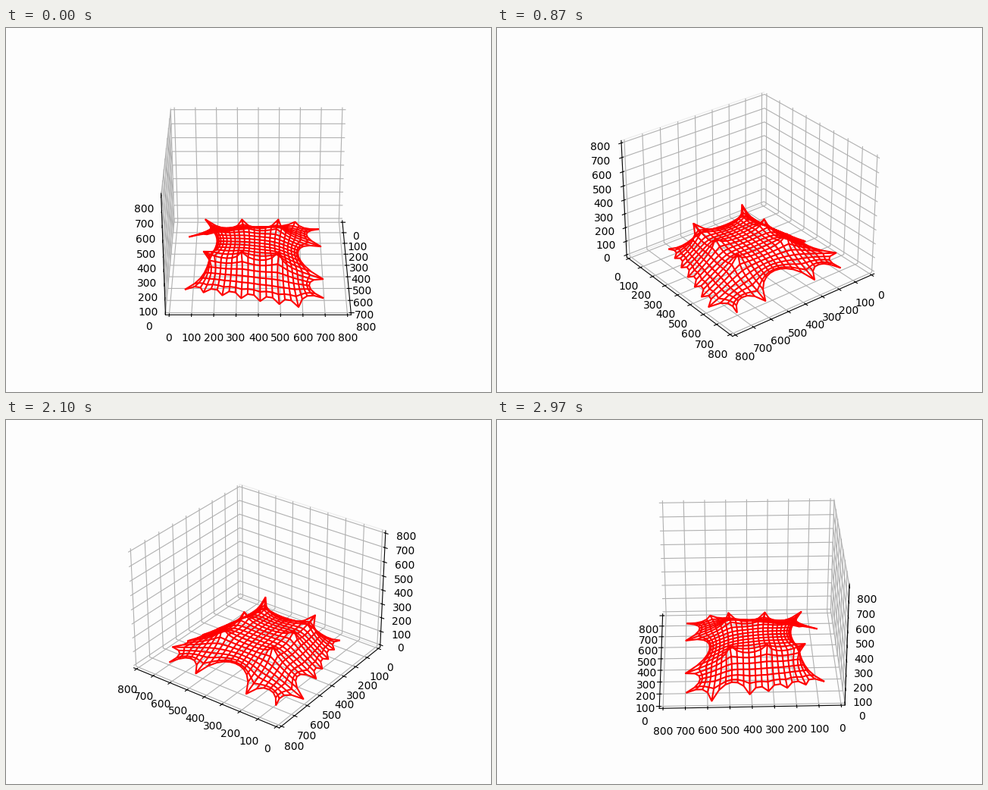
Animation of 640 by 480 pixels, one loop 3 s. Source, as a matplotlib script:

```python
import numpy as np
import matplotlib.pyplot as plt
from matplotlib.animation import FuncAnimation

SIZE = 800          # extent of each axis
N = 23              # net nodes per side
FRAMES = 100
PAPER = "#fdfdfd"


def anchors():
    """Fixed nodes of the net: (i, j) -> (x, y, z)."""
    mid, last = 395, N - 1
    step = 28.83
    fixed = {}
    # Slanted sides, pegged at every third node; one peg is left out.
    for j in range(0, 19, 3):
        half, y = 234 + 8 * j, 62.5 + step * j
        fixed[last, j] = (mid + half, y, 0)
        if j != 15:
            fixed[0, j] = (mid - half, y, 0)
    # Front side.
    for i, x, y in ((0, 87, 697), (6, 250, 700), (16, 540, 700), (last, 700, 697)):
        fixed[i, last] = (x, y, 0)
    # Masts.
    for j in (3, 9, 15):
        for i, x in ((6, 250), (16, 540)):
            fixed[i, j] = (x, 62.5 + step * j, 200)
    return fixed


def relax(fixed):
    """Equilibrium of the net with equal force density in every cable."""
    ids = np.arange(N * N).reshape(N, N)
    lap = np.zeros((N * N, N * N))
    cables = np.vstack([
        np.column_stack([ids[:-1].ravel(), ids[1:].ravel()]),
        np.column_stack([ids[:, :-1].ravel(), ids[:, 1:].ravel()]),
    ])
    for a, b in cables:
        lap[a, a] += 1
        lap[b, b] += 1
        lap[a, b] -= 1
        lap[b, a] -= 1
    load = np.zeros((N * N, 3))
    for (i, j), point in fixed.items():
        row = ids[i, j]
        lap[row] = 0
        lap[row, row] = 1
        load[row] = point
    return np.linalg.solve(lap, load).reshape(N, N, 3)


fig = plt.figure(figsize=(6.4, 4.8), dpi=100, facecolor=PAPER)
ax = fig.add_subplot(projection="3d", facecolor=PAPER)

net = relax(anchors())
ax.plot_wireframe(net[..., 0], net[..., 1], net[..., 2],
                  rstride=1, cstride=1, color="red", linewidth=1.5)

margin = SIZE / 48
ax.set(xlim=(-margin, SIZE + margin),
       ylim=(-margin, SIZE + margin),
       zlim=(-margin, SIZE + margin))
for axis in (ax.xaxis, ax.yaxis, ax.zaxis):
    axis.set_ticks(range(0, SIZE + 1, 100))
    axis.set_pane_color((1, 1, 1, 0))
ax.yaxis.pane.set(fill=False, alpha=1, edgecolor="#efefef")


def update(k):
    # The tiny offset keeps the first view from being exactly edge-on.
    ax.view_init(elev=30, azim=0.01 + 180 * k / FRAMES)
    return []


anim = FuncAnimation(fig, update, frames=FRAMES, init_func=lambda: update(0),
                     interval=30, repeat=True, repeat_delay=0, blit=False)
plt.show()
```
